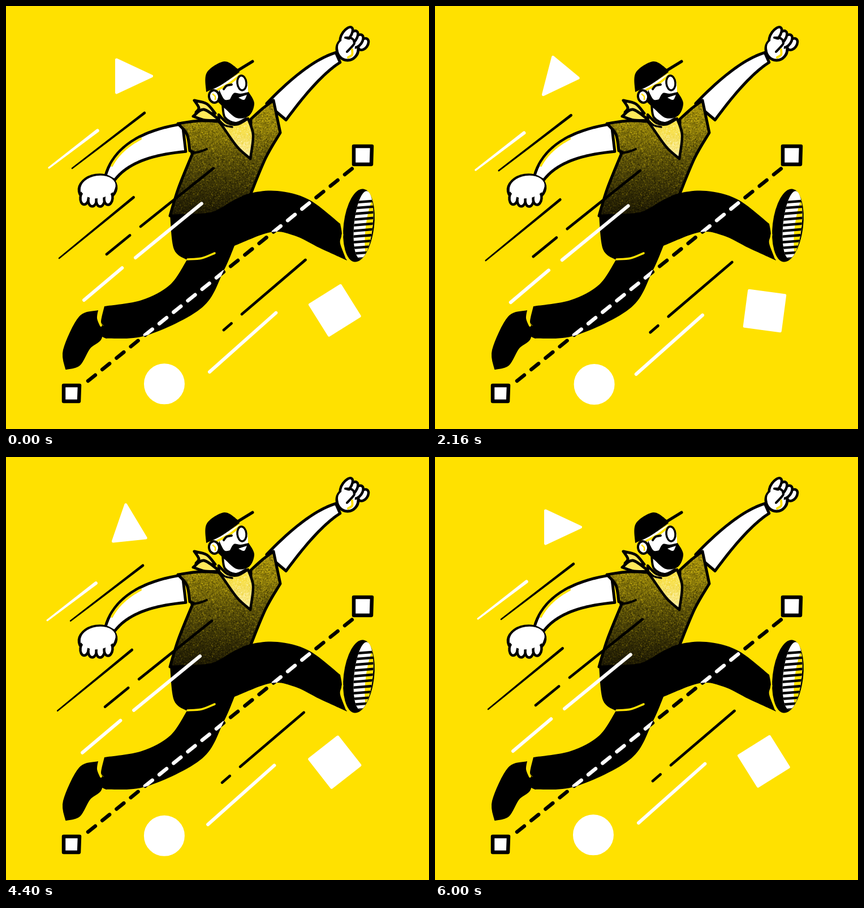
Write an HTML page with a canvas that moves like this. It is 748 px wide and 748 px high and loops after 6040 ms.

```html
<!DOCTYPE html>
<html lang="en">
<head>
<meta charset="utf-8">
<title>Leap</title>
<style>
html, body { margin: 0; width: 100%; height: 100%; overflow: hidden; background: #ffe100; }
canvas { display: block; }
</style>
</head>
<body>
<canvas id="stage" width="748" height="748"></canvas>
<script>
const SIZE = 748, LOOP = 6040, CYCLE = 6000, STEP = 40, TAU = Math.PI * 2;
const YELLOW = '#ffe100', BLACK = '#000', WHITE = '#fff', CREAM = '#ffe85a';
const ctx = document.getElementById('stage').getContext('2d');

// Smooth curve through key points; "|" marks a corner.
function curve(text, closed) {
  const path = new Path2D();
  let last = null;
  for (const piece of text.split('|')) {
    const pts = piece.trim().split(/\s+/).map(s => s.split(',').map(Number));
    if (last) pts.unshift(last);
    else path.moveTo(...pts[0]);
    for (let i = 0; i < pts.length - 1; i++) {
      const b = pts[i], c = pts[i + 1], a = pts[i - 1] || b, d = pts[i + 2] || c;
      path.bezierCurveTo(b[0] + (c[0] - a[0]) / 6, b[1] + (c[1] - a[1]) / 6,
        c[0] - (d[0] - b[0]) / 6, c[1] - (d[1] - b[1]) / 6, c[0], c[1]);
    }
    last = pts[pts.length - 1];
  }
  if (closed) path.closePath();
  return path;
}

const shape = text => curve(text, true);

function oval(x, y, rx, ry, turn = 0) {
  const path = new Path2D();
  path.ellipse(x, y, rx, ry, turn, 0, TAU);
  return path;
}

// One side of a bent limb whose width swells in the middle
function limbSide(limb, side, from, to) {
  const { start, bend, end, w0, w1, swell } = limb, pts = [];
  for (let i = 0; i <= 20; i++) {
    const t = from + (to - from) * i / 20, u = 1 - t;
    const at = k => u * u * start[k] + 2 * u * t * bend[k] + t * t * end[k];
    const vel = k => u * (bend[k] - start[k]) + t * (end[k] - bend[k]);
    const w = side * (u * w0 + t * w1 + 4 * u * t * swell) / 2;
    const vx = vel(0), vy = vel(1), len = Math.hypot(vx, vy);
    pts.push([at(0) - vy / len * w, at(1) + vx / len * w]);
  }
  return pts;
}

function polyline(pts, closed) {
  const path = new Path2D();
  pts.forEach(p => path.lineTo(...p));
  if (closed) path.closePath();
  return path;
}

function seeded(seed) {
  return () => (seed = (seed * 16807) % 2147483647) / 2147483647;
}

function makeLayer(draw) {
  const layer = document.createElement('canvas');
  layer.width = layer.height = SIZE;
  const g = layer.getContext('2d');
  g.lineCap = g.lineJoin = 'round';
  draw(g);
  return layer;
}

function drawFigure(g) {
  const fill = (path, color) => {
    g.fillStyle = color;
    g.fill(path);
  };
  const line = (path, width = 4, color = BLACK) => {
    g.strokeStyle = color;
    g.lineWidth = width;
    g.stroke(path);
  };
  const ink = (path, color, width = 5) => {
    fill(path, color);
    line(path, width);
  };
  const grain = (path, x, y, w, h, count, pick) => {
    const rnd = seeded(71);
    g.save();
    g.clip(path);
    for (let i = 0; i < count; i++) {
      const v = rnd();
      g.fillStyle = pick(rnd(), v);
      g.fillRect(x + rnd() * w, y + v * h, 1.6, 1.6);
    }
    g.restore();
  };
  const fade = (y0, y1, ...colors) => {
    const tone = g.createLinearGradient(0, y0, 0, y1);
    colors.forEach((c, i) => tone.addColorStop(i / (colors.length - 1), c));
    return tone;
  };

  // Arms
  const rear = { start: [315, 233], bend: [212, 245], end: [184, 304], w0: 49, w1: 18, swell: 5 };
  const lead = { start: [478, 187], bend: [542, 111], end: [587, 91], w0: 45, w1: 19, swell: 0 };
  for (const arm of [rear, lead]) {
    const sides = [...limbSide(arm, 1, 0, 1), ...limbSide(arm, -1, 1, 0)];
    ink(polyline(sides, true), WHITE, 5);
  }
  const shade = { ...rear, w0: 41, w1: 10 };
  line(polyline(limbSide(shade, 1, .4, .85)), 4, YELLOW);

  // Rear fist
  ink(oval(162, 323, 33, 24, -.15), WHITE);
  for (let i = 0; i < 4; i++) {
    ink(oval(139 + 14 * i, 339 + 4 * Math.sin(i), 7.5, 12, .1), WHITE, 4.5);
  }
  fill(oval(163, 320, 31, 20, -.15), WHITE);

  // Raised fist
  ink(oval(604, 76, 19, 20), WHITE);
  for (let i = 3; i >= 0; i--) {
    ink(oval(602 + 10 * i, 51 + 5.5 * i, 16 - 1.5 * i, 7.5, -.95), WHITE, 4.5);
  }
  fill(oval(602, 73, 15, 14), WHITE);
  line(curve('600,56 611,57 616,66 603,81'), 4);
  line(curve('612,77 612,86 605,91'), 4, YELLOW);

  // Shirt
  const shirt = shape('304,208 340,203 376,204 | 432,270 | 433,200 | 453,182 473,167 | 485,224 | 459,269 432,334 | 370,366 290,371 | 305,322 331,258 | 325,256 | 320,227 304,208');
  fill(shirt, fade(165, 372, '#b9a10b', '#8d7c0a', '#5f5408', '#3a3306', '#1d1904'));
  grain(shirt, 286, 165, 202, 210, 13000, (r, v) =>
    r > .5 + v * .3 ? `rgba(255,225,30,${.36 - v * .26})` : 'rgba(0,0,0,.2)');
  line(shirt, 5);
  line(curve('328,260 341,258 355,253'));

  // Scarf
  ink(shape('333,167 355,173 370,190 | 352,190 336,188 | 341,180 333,167'), CREAM);
  ink(shape('331,195 350,183 378,202 | 352,202 331,195'), CREAM);
  const scarf = shape('376,192 392,207 410,209 428,199 | 437,228 432,270 | 408,248 377,204');
  fill(scarf, fade(200, 265, '#ffe436', '#f5e05c', '#fff0a0'));
  grain(scarf, 375, 190, 64, 82, 900, r => r > .5 ? 'rgba(255,255,220,.35)' : 'rgba(225,195,30,.3)');
  line(scarf, 4.5);

  // Head
  fill(shape('383,170 385,195 406,207 424,199 | 424,180'), WHITE);
  line(curve('383,174 387,197 406,207 424,199'));
  line(curve('378,203 387,211 400,214'), 3.5);
  fill(shape('366,147 412,120 | 426,132 428,154 | 405,178 370,168'), WHITE);
  line(curve('374,148 394,138 413,123'), 4, YELLOW);
  ink(oval(368, 160, 9, 11, -.2), WHITE, 4);
  line(curve('366,156 370,160 370,165'), 2.5, YELLOW);
  fill(shape('377,148 386,165 396,165 | 403,154 415,155 429,152 | 439,172 430,194 408,198 388,182 374,169'), BLACK);
  fill(shape('411,162 426,157 | 421,166 411,162'), WHITE);
  line(curve('385,147 390,141 399,139'));
  line(oval(417, 136, 8, 13, -.1), 3.5);
  fill(shape('354,152 355,118 386,98 411,112 | 413,117 | 380,140 354,152'), BLACK);
  line(curve('405,117 436,98'), 5);

  // Legs
  const legs = shape('290,370 358,366 398,346 | 432,331 480,327 535,342 591,385 | 594,404 591,420 603,450 | 555,428 510,406 468,400 404,424 | 385,468 347,533 250,582 177,588 | 166,581 173,567 168,558 174,531 | 240,520 290,493 320,449 | 297,430 290,370');
  fill(legs, BLACK);
  const boot = shape('163,539 130,550 102,608 106,642 | 130,635 148,605 167,590 173,567 | 164,558 163,539');
  ink(boot, BLACK, 2);
  line(curve('321,448 346,446 369,437'), 3.5, YELLOW);
  line(curve('165,538 163,552 168,565'), 4, YELLOW);

  // Front shoe
  fill(oval(624, 388, 27, 65, .12), BLACK);
  line(curve('595,404 594,421 602,446'), 3, YELLOW);
  g.save();
  g.clip(oval(632, 387, 16.5, 60, .1));
  fill(oval(632, 387, 30, 70), WHITE);
  fill(oval(653, 392, 17, 66, .12), YELLOW);
  g.translate(632, 387);
  g.rotate(-.08);
  g.fillStyle = BLACK;
  for (let y = -43; y < 58; y += 10) g.fillRect(-22, y, 44, 4.5);
  g.restore();

  // Dashed guide, inverted over the trousers
  const guide = polyline([[145, 663], [614, 286]]);
  g.setLineDash([16.5, 15.86]);
  line(guide, 6.5);
  g.save();
  g.clip(legs);
  line(guide, 6.5, WHITE);
  g.restore();
  g.setLineDash([]);

  for (const [x, y, r] of [[116, 685, 14], [631, 264, 16]]) {
    ink(shape(`${x - r},${y - r} | ${x + r},${y - r} | ${x + r - 1},${y + r} | ${x - r},${y + r}`), WHITE, 6.5);
  }
}

// Streaks get steeper further down; the upper ones start thin.
function streak(x, y, len, color) {
  const a = -(37 + (y - 250) / 85) * Math.PI / 180, q = Math.PI / 2;
  const wide = color === WHITE ? 3 : 2.4, thin = x < 130 ? wide * .55 : wide;
  ctx.fillStyle = color;
  ctx.beginPath();
  ctx.arc(x, y, thin, a + q, a - q);
  ctx.arc(x + len * Math.cos(a), y + len * Math.sin(a), wide, a - q, a + q);
  ctx.fill();
}

function drawStreaks() {
  streak(76, 286, 108, WHITE);
  streak(117, 287, 161, BLACK);
  streak(94, 446, 170, BLACK);
  streak(238, 390, 165, BLACK);
  streak(178, 439, 53, BLACK);
  streak(229, 445, 151, WHITE);
  streak(138, 520, 88, WHITE);
  streak(417, 545, 148, BLACK);
  streak(385, 573, 18, BLACK);
  streak(360, 647, 157, WHITE);
}

// Small clockwise drift around a centre
function drift(x, y, r, angle) {
  return [x + r * Math.sin(angle), y - r * Math.cos(angle)];
}

// Regular polygon with softened corners
function solid(center, turn, sides, radius) {
  const pts = [];
  for (let i = 0; i < sides; i++) {
    const a = turn + i * TAU / sides;
    pts.push([center[0] + radius * Math.cos(a), center[1] + radius * Math.sin(a)]);
  }
  return polyline(pts, true);
}

// The triangle is slightly longer than a regular one.
function wedge([x, y], turn) {
  const spin = (u, v) => [x + u * Math.cos(turn) - v * Math.sin(turn), y + u * Math.sin(turn) + v * Math.cos(turn)];
  return polyline([spin(42, 0), spin(-20, 29), spin(-20, -29)], true);
}

function paint(path) {
  ctx.fillStyle = ctx.strokeStyle = WHITE;
  ctx.lineWidth = 5;
  ctx.lineJoin = 'round';
  ctx.fill(path);
  ctx.stroke(path);
}

const figure = makeLayer(drawFigure);

function render(ms) {
  const p = Math.min(Math.floor(ms / STEP) * STEP, CYCLE) / CYCLE;
  const turn = p * TAU;
  ctx.fillStyle = YELLOW;
  ctx.fillRect(0, 0, SIZE, SIZE);
  ctx.drawImage(figure, 0, 0);

  const slide = (1 - Math.cos(turn)) / 2;
  ctx.save();
  ctx.translate(-5.2 * slide, 5 * slide);
  drawStreaks();
  ctx.restore();

  paint(wedge(drift(216.8, 124.8, 1.5, turn - 1.05), turn));
  paint(solid(drift(582, 539, 1, turn - .7), turn - .56 + TAU / 8, 4, 45));
  paint(oval(...drift(280.6, 669, 1, turn - .7), 33.5, 33.5));
}

let start = null;
function tick(now) {
  if (start === null) start = now;
  render((now - start) % LOOP);
  requestAnimationFrame(tick);
}
render(0);
requestAnimationFrame(tick);
</script>
</body>
</html>
```
